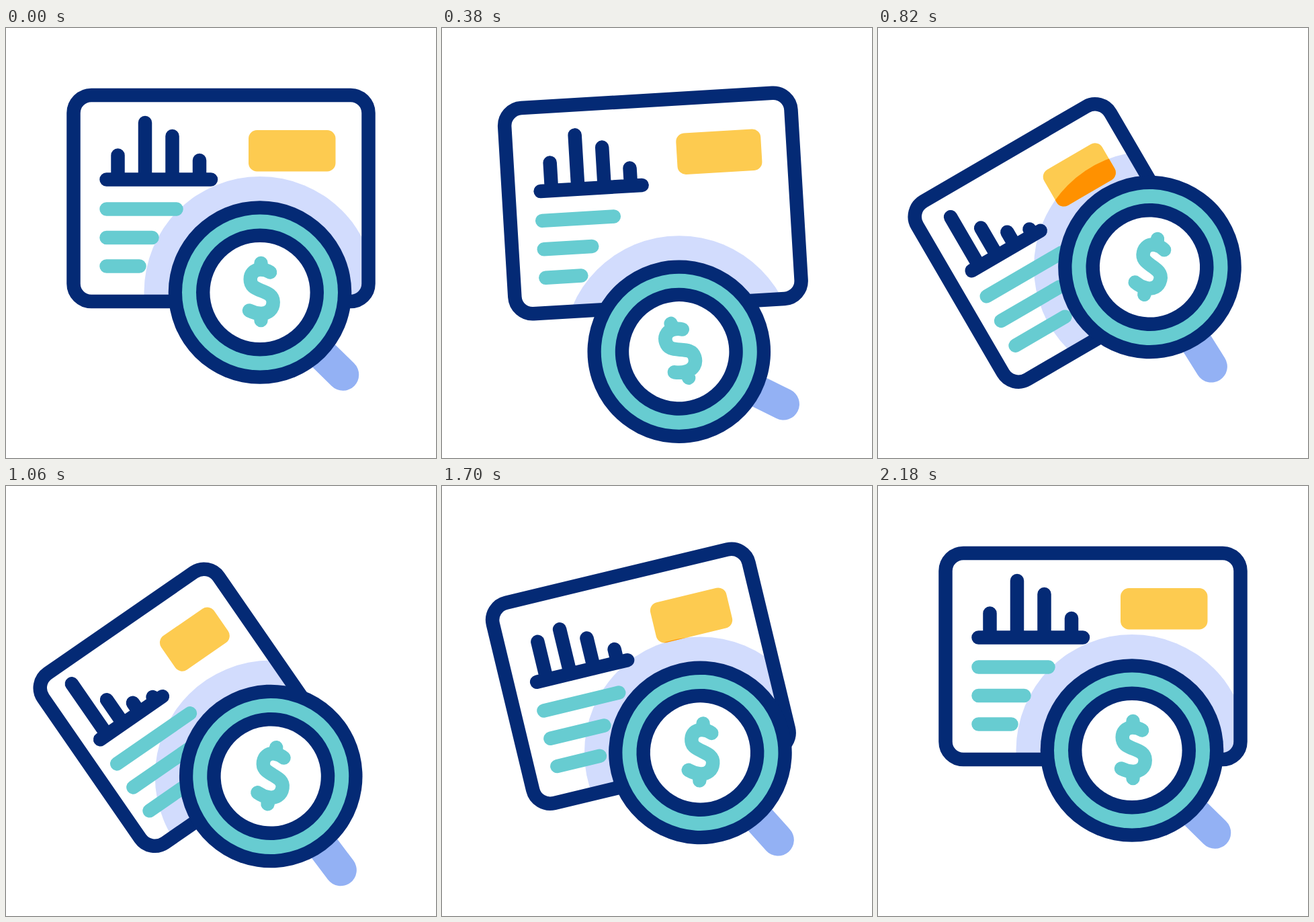
Animation of 640x640 px, one loop 2.4 s. Source, as an HTML page:

```html
<!DOCTYPE html>
<html lang="en">
<head>
<meta charset="utf-8">
<title>Report audit</title>
<style>
  html, body { margin: 0; width: 100%; height: 100%; overflow: hidden; background: #fff; }
  svg { display: block; width: 100%; height: 100%; }
  .navy { stroke: #042a75; }
  .teal { stroke: #67ccd1; }
  .line { fill: none; stroke-width: 20.5; stroke-linecap: round; stroke-linejoin: round; }
</style>
</head>
<body>
<svg viewBox="0 0 640 640">
  <defs>
    <clipPath id="inCard"><rect class="frame" rx="26.5"/></clipPath>
    <clipPath id="inHalo"><circle class="halo" r="172.5"/></clipPath>
  </defs>

  <g clip-path="url(#inCard)"><circle class="halo" r="172.5" fill="#d2dcfd"/></g>
  <g class="card"><rect class="label" rx="12.5" fill="#fdcb50"/></g>
  <g clip-path="url(#inHalo)">
    <g class="card"><rect class="label" rx="12.5" fill="#ff9100"/></g>
  </g>
  <g class="card">
    <path id="rows" class="line teal"/>
    <path id="chart" class="line navy"/>
    <rect class="frame line navy" rx="26.5"/>
  </g>

  <g id="lens">
    <path d="M70 70L123.5 122.5" fill="none" stroke="#93b1f4" stroke-width="47.5" stroke-linecap="round"/>
    <circle r="136.3" fill="#042a75"/>
    <circle r="116" fill="#67ccd1"/>
    <circle r="95" fill="#042a75"/>
    <circle r="74.6" fill="#fff"/>
    <path class="line teal" d="M15-30Q9-34 1-34C-10-34-14.3-26.5-14.3-19.5C-14.3-9.5-8-6.5 2-2.5C12 1.5 19.7 4.5 19.7 14.5C19.7 25.5 12 31.5 2 31.5Q-7 31.5-16 27M1.5-43.5V-35M1.5 33V41.5"/>
  </g>
</svg>
<script>
const LOOP = 2400;
const all = q => document.querySelectorAll(q);
const lerp = (a, b, p) => a + (b - a) * p;

// Smooth curve through [time, value] points, flat at every peak.
function curve(...pts) {
  const last = pts.length - 1;
  const slope = i => (pts[i + 1][1] - pts[i][1]) / (pts[i + 1][0] - pts[i][0]);
  const tan = pts.map((_, i) => {
    if (i === 0 || i === last) return 0;
    const a = slope(i - 1), b = slope(i);
    return a * b > 0 ? 2 * a * b / (a + b) : 0;
  });
  return t => {
    if (t <= pts[0][0]) return pts[0][1];
    if (t >= pts[last][0]) return pts[last][1];
    let i = 0;
    while (t >= pts[i + 1][0]) i++;
    const [t0, v0] = pts[i], [t1, v1] = pts[i + 1];
    const d = t1 - t0, u = (t - t0) / d, w = 1 - u;
    return v0 * w * w * (1 + 2 * u) + v1 * u * u * (3 - 2 * u)
      + d * u * w * (tan[i] * w - tan[i + 1] * u);
  };
}

// The card tips over until TURN, then retraces the same move backwards.
const TURN = 1131, FULL = 30.2;
const tip = curve([80, 0], [380, 3.4], [562, 13.6], [642, 22.3], [820, FULL], [TURN, 35]);
const cardTilt = t => tip(TURN - Math.abs(t - TURN));

// The lens rocks and bobs, both dying away.
const lensTilt = curve([0, 0], [375, -18.1], [900, 15.5], [1340, -7.3], [1750, 4], [2160, 0]);
const lensDrop = curve([0, 0], [370, 47], [580, -7.9], [720, -17], [820, -12.9],
  [1060, 55], [1340, -12.8], [1440, -17], [1770, 14], [2160, 0]);

// Lengths: level card, then card tilted by FULL.
const BARS = [[36, 85], [84.5, 48.3], [64.5, 23.2], [28.5, 10.2]];
const ROWS = [[104, 128.5], [68, 100], [49, 85.4]];

const setAll = (q, attrs) => all(q).forEach(e => {
  for (const k in attrs) e.setAttribute(k, attrs[k]);
});

function drawCard(t) {
  const tilt = cardTilt(t), p = tilt / FULL;
  const transform = `translate(${320 - 1.785 * tilt} ${253.5 + 2.2 * tilt}) rotate(${-tilt})`;
  setAll(".card, #inCard rect", { transform });

  const half = lerp(219.5, 166.5, p);
  setAll(".frame", { x: -half, y: -153.4, width: 2 * half, height: 306.8 });

  const width = lerp(129.5, 100, p);
  setAll(".label", { x: lerp(105.75, 80.3, p) - width / 2, y: -101.5, width, height: 61.5 });

  const left = lerp(-170.5, -130, p), scale = lerp(1, 0.76, p);
  const bars = BARS.map(([a, b], i) =>
    `M${left + scale * (17 + 40.5 * i)} -28v${-lerp(a, b, p)}`);
  const rows = ROWS.map(([a, b], i) =>
    `M${left} ${16 + 42.5 * i}h${lerp(a, b, p)}`);
  setAll("#chart", { d: `M${left} -28h${155.5 * scale}` + bars.join("") });
  setAll("#rows", { d: rows.join("") });
}

function drawLens(t) {
  // The swing is about a point on the handle.
  const deg = lensTilt(t), a = deg * Math.PI / 180;
  const s = Math.sin(a), c = 1 - Math.cos(a);
  const cx = 378 + 118 * c + 100 * s;
  const cy = 393.5 + 100 * c - 118 * s + lensDrop(t);
  setAll("#lens", { transform: `translate(${cx} ${cy}) rotate(${deg})` });
  setAll(".halo", { cx, cy });
}

const start = performance.now();
function tick() {
  const t = (performance.now() - start) % LOOP;
  drawCard(t);
  drawLens(t);
  requestAnimationFrame(tick);
}
tick();
</script>
</body>
</html>
```
